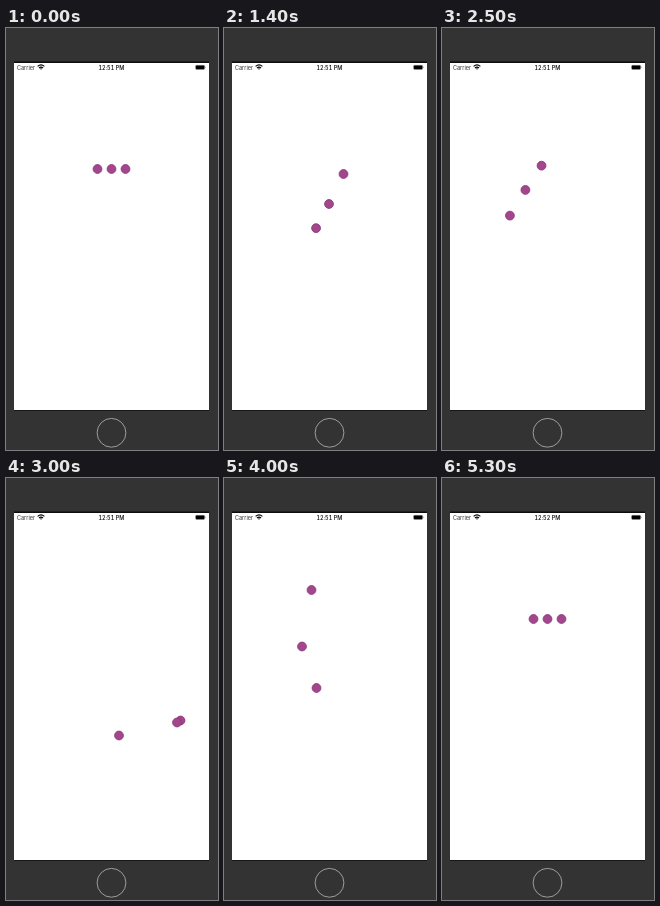
An HTML page that plays this animation: 212 px wide and 422 px high, repeating every 5500 ms.

```html
<!DOCTYPE html>
<html lang="en">
<head>
<meta charset="utf-8">
<title>Trailing dots</title>
<style>
  html, body { margin: 0; width: 100%; height: 100%; overflow: hidden; background: #333; }
  svg { display: block; width: 100%; height: 100%; }
  text { font: 5.5px Inter, Roboto, sans-serif; }
  #clock { font-weight: 500; font-variant-numeric: tabular-nums; }
</style>
</head>
<body>
<svg viewBox="0 0 212 422">
  <rect width="212" height="422" fill="#333"/>
  <rect x="8" y="33.5" width="195" height="349.2" fill="#0c0c0c"/>
  <rect x="8" y="35" width="195" height="347" fill="#fff"/>

  <text x="11" y="41.6" fill="#333">Carrier</text>
  <g fill="none" stroke="#000" stroke-width="1.1">
    <path d="M31.6 38.4Q35 35.4 38.4 38.4"/>
    <path d="M33 40Q35 38.3 37 40"/>
  </g>
  <path d="M34 40.7Q35 40 36 40.7L35 41.8Z"/>
  <text id="clock" x="105.4" y="41.6" text-anchor="middle">12:51 PM</text>
  <rect x="189.6" y="37.3" width="9" height="4.2" rx="1" fill="#000" stroke="#999" stroke-width="0.4"/>
  <rect x="198.9" y="38.7" width="0.6" height="1.4" rx="0.3" fill="#777"/>

  <circle cx="105.5" cy="404.8" r="14.4" fill="#333" stroke="#aaa" stroke-width="0.9"/>

  <g id="dots" fill="#a4468c" stroke="#87397a" stroke-width="0.9"></g>
</svg>
<script>
  const LOOP = 5500, STEP = 100, CLOCK_TICK = 4300;
  const GAP = 14, LAG = 100;
  const HOME = [91.5, 141];

  // Turning points of the drag: time in ms, x, y.
  const path = [
    [1100, ...HOME], [1200, 91.5, 146], [1300, 91, 176], [1500, 96, 213],
    [1700, 120, 175], [1900, 114, 117], [2100, 90, 96.5], [2350, 70, 150],
    [2800, 85, 257.5], [2900, 160.5, 242.5], [3000, 171, 244.5], [3100, 120, 268],
    [3600, 80, 70], [3800, 59.5, 112], [3900, 64, 168.5], [4000, 92.5, 210],
    [4300, 70, 124], [4500, 103, 221], [4600, 117.5, 189.5], [4700, 94.5, 140],
    [4800, 88, 118], [4900, 91.5, 143.5], [5000, ...HOME]
  ];

  // Smooth curve through the turning points; at rest outside them.
  function leaderAt(time) {
    const next = path.findIndex(point => point[0] > time);
    if (next < 1) return HOME;
    const from = path[next - 1], to = path[next];
    const before = path[next - 2] || from, after = path[next + 1] || to;
    const span = to[0] - from[0], u = (time - from[0]) / span;
    const ease = u * u * (3 - 2 * u);
    return [1, 2].map(axis => {
      const leave = span * (to[axis] - before[axis]) / (to[0] - before[0]);
      const arrive = span * (after[axis] - from[axis]) / (after[0] - from[0]);
      return from[axis] + (to[axis] - from[axis]) * ease
        + u * (1 - u) * ((1 - u) * leave - u * arrive);
    });
  }

  const layer = document.getElementById('dots');
  const clock = document.getElementById('clock');

  // The leader is drawn last, so it stays on top.
  const dots = [2, 1, 0].map(rank => {
    const node = document.createElementNS('http://www.w3.org/2000/svg', 'circle');
    node.setAttribute('r', 4.4);
    layer.append(node);
    return { node, rank };
  });

  function draw(time) {
    const held = Math.floor(time / STEP) * STEP;
    for (const { node, rank } of dots) {
      const [x, y] = leaderAt(held - rank * LAG);
      node.setAttribute('cx', x + rank * GAP);
      node.setAttribute('cy', y);
    }
    clock.textContent = time < CLOCK_TICK ? '12:51 PM' : '12:52 PM';
  }

  const began = performance.now();
  function tick() {
    draw((performance.now() - began) % LOOP);
    requestAnimationFrame(tick);
  }
  tick();
</script>
</body>
</html>
```
